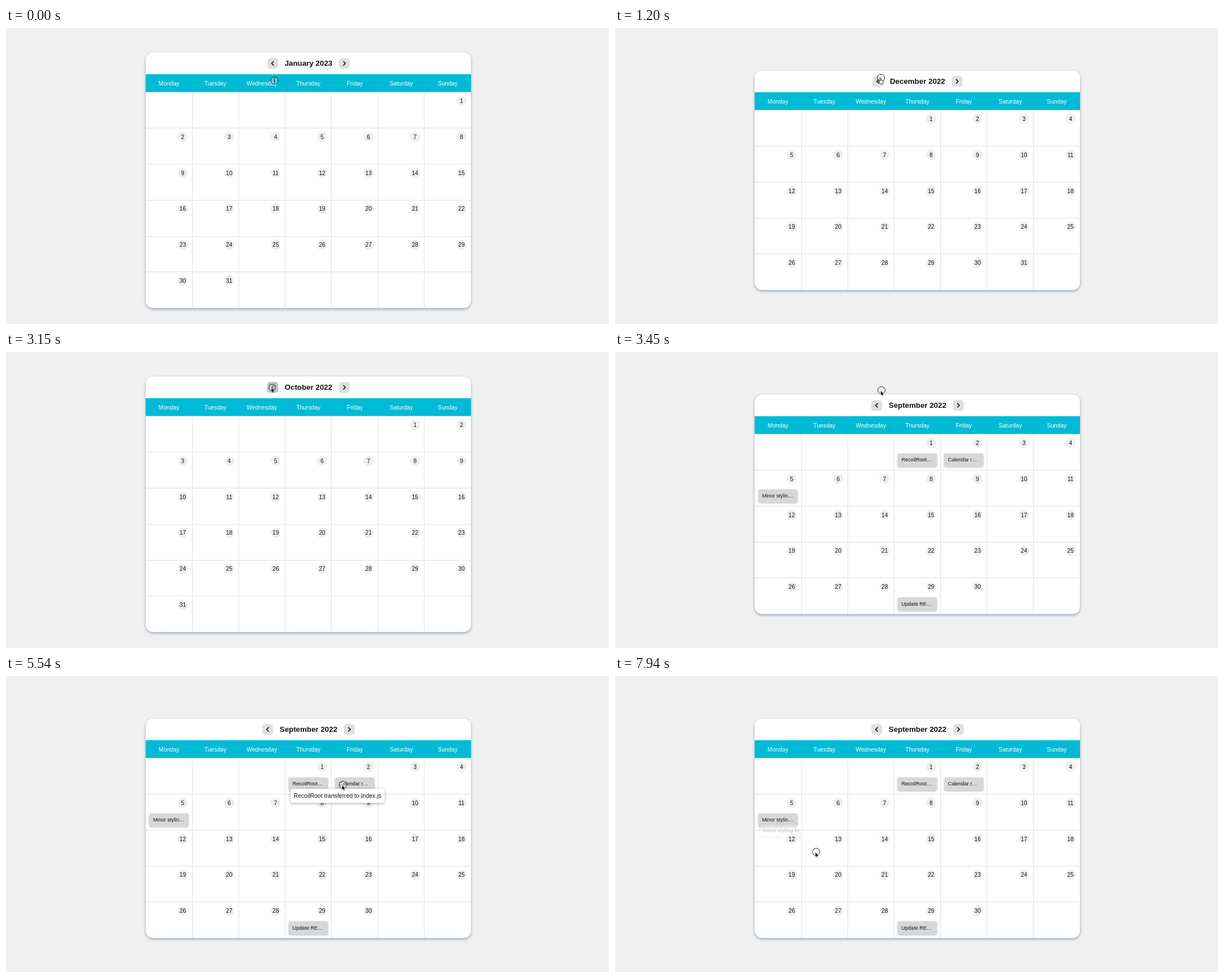
Write an HTML page that moves like this. It is 1066 px wide and 525 px high and loops after 8 s.

```html
<!DOCTYPE html>
<html lang="en">
<head>
<meta charset="utf-8">
<title>Calendar</title>
<style>
  html, body { margin: 0; width: 100%; height: 100%; overflow: hidden; background: #f0f0f0; }
  svg { display: block; font: 10.24px "Liberation Sans", Arial, sans-serif; fill: #111; }
  .card { fill: #fff; filter: drop-shadow(0 2px 2.5px rgba(20, 60, 100, .42)); }
  .bar { fill: #00bad6; }
  .day { fill: #fff; }
  .mid { text-anchor: middle; }
  .title { font-size: 13.3px; font-weight: bold; }
  .grid { stroke: #dfdfdf; fill: none; }
  .dot { fill: #efefef; }
  .btn { fill: #e0e0e0; }
  .down { fill: #b9c0c6; }
  .chev { fill: none; stroke: #111; stroke-width: 1.6; }
  .pill { fill: #d7d7d7; filter: drop-shadow(0 1.5px 1.5px rgba(0, 0, 0, .28)); }
  .note { font-size: 9.1px; }
  .tip { fill: #fff; filter: drop-shadow(0 1px 2.5px rgba(0, 0, 0, .35)); }
  .tipText { font-size: 10.45px; }
  .ring { fill: rgba(255, 255, 255, .3); stroke: #222; }
  .arrow { fill: #000; stroke: #fff; stroke-width: .8; }
  .hand { fill: #fff; stroke: #111; stroke-width: .9; }
  .beam { fill: none; stroke: #333; }
</style>
</head>
<body>
<svg id="stage" width="1066" height="525"></svg>
<script>
const LOOP = 8000, LEFT = 247, WIDTH = 575, COL = WIDTH / 7, ROW = 63.85, HEAD = 70.1;
const DAYS = ['Monday', 'Tuesday', 'Wednesday', 'Thursday', 'Friday', 'Saturday', 'Sunday'];

// month shown from each time on: [time, year, month index]
const MONTHS = [[0, 2023, 0], [750, 2022, 11], [1500, 2022, 10], [2250, 2022, 9], [3300, 2022, 8]];
const PRESSES = [600, 1350, 2100, 3150];

// September notes, with the times their tooltip opens and closes
const NOTES = [
  { day: 1, short: 'RecoilRoot…', full: 'RecoilRoot transferred to Index.js', tip: 166, open: 4300, close: 5740 },
  { day: 2, short: 'Calendar r…', full: 'Calendar restyling', tip: 95, open: 5640, close: 6490 },
  { day: 5, short: 'Minor stylin…', full: 'Minor styling fix', tip: 83, open: 7440, close: 7990 },
  { day: 29, short: 'Update RE…' }
];

// cursor path: time, x, y, shape
const PATH = [
  [0, 474.5, 93, 'beam'], [150, 473, 81, 'arrow'], [300, 471, 68, 'hand'], [450, 470, 63, 'hand'],
  [750, 470, 63, 'arrow'], [1050, 470, 87, 'hand'], [1200, 470, 88.5, 'hand'], [1350, 469, 92, 'arrow'],
  [1800, 469, 93, 'hand'], [2100, 469, 93, 'arrow'], [2400, 469, 90, 'arrow'], [2850, 470.5, 63, 'hand'],
  [3150, 470.5, 63, 'arrow'], [3450, 471, 68, 'arrow'], [4050, 494, 176, 'arrow'], [4350, 517.5, 194, 'arrow'],
  [5240, 545, 194, 'arrow'], [5540, 595.5, 193, 'arrow'], [5840, 599, 193, 'arrow'], [6290, 592, 197, 'arrow'],
  [6890, 345, 268, 'arrow'], [7040, 319, 265.5, 'hand'], [7190, 308, 261, 'hand'], [7340, 304, 257, 'hand'],
  [7640, 308, 259, 'hand'], [7940, 355.5, 312, 'arrow']
];
const SHAPES = {
  arrow: 'M-1.5 0v9.4l2-1.9 1.3 3 1.7-.7-1.3-2.9h2.8z',
  hand: 'M-1.6 1.2c0-1.4 1.8-1.4 1.8 0v3l3.3.8q1 .3.8 1.6l-.6 3.9h-4.6l-3.2-4.2q0-1 1-.8l1.5 1z',
  beam: 'M-1.7-4.2q1.7 0 1.7 1v6.4q0 1 1.7 1M1.7-4.2q-1.7 0-1.7 1v6.4q0 1-1.7 1M-1 0h2'
};

const clamp = v => Math.max(0, Math.min(1, v));
const text = (x, y, s, cls) => `<text x="${x}" y="${y}" class="${cls}">${s}</text>`;
const rect = (x, y, w, h, r, cls) =>
  `<rect x="${x}" y="${y}" width="${w}" height="${h}" rx="${r}" class="${cls}"/>`;

function titleWidth(s) {
  const pen = titleWidth.pen ||= document.createElement('canvas').getContext('2d');
  pen.font = 'bold 13.3px "Liberation Sans", Arial, sans-serif';
  return pen.measureText(s).width;
}

function button(x, y, dir, down) {
  return rect(x - 9.6, y - 9.6, 19.2, 19.2, 5, down ? 'down' : 'btn') +
    `<path class="chev" d="M${x - dir * 1.9} ${y - 3.8}l${dir * 3.8} 3.8l${-dir * 3.8} 3.8"/>`;
}

function calendar(t) {
  const [, year, month] = MONTHS.findLast(m => m[0] <= t);
  const first = (new Date(year, month, 1).getDay() + 6) % 7;
  const count = new Date(year, month + 1, 0).getDate();
  const rows = Math.ceil((first + count) / 7);
  const height = HEAD + rows * ROW, top = 270.1 - height / 2, body = top + HEAD;
  const cx = LEFT + WIDTH / 2 + .3, cy = top + 19.3;
  const title = new Date(year, month).toLocaleString('en-US', { month: 'long' }) + ' ' + year;
  const side = titleWidth(title) / 2 + 21.2;
  const down = PRESSES.some(p => t >= p && t < p + 150);
  const cell = d => {
    const i = first + d - 1;
    return [LEFT + i % 7 * COL, body + Math.floor(i / 7) * ROW];
  };

  let out = rect(LEFT, top, WIDTH, height, 13, 'card') + rect(LEFT, top + 38.5, WIDTH, HEAD - 38.5, 0, 'bar') +
    text(cx, cy + 4.6, title, 'mid title') + button(cx - side, cy, -1, down) + button(cx + side, cy, 1);
  DAYS.forEach((d, i) => out += text(LEFT + (i + .5) * COL, top + 58.1, d, 'mid day'));

  let lines = '';
  for (let i = 1; i < 7; i++) lines += `M${Math.floor(LEFT + i * COL) + .5} ${body}V${top + height}`;
  for (let i = 1; i < rows; i++) lines += `M${LEFT} ${Math.floor(body + i * ROW) + .5}h${WIDTH}`;
  out += `<path class="grid" d="${lines}"/>`;

  for (let d = 1; d <= count; d++) {
    const [x, y] = cell(d);
    out += `<circle class="dot" cx="${x + 65.4}" cy="${y + 15.6}" r="9"/>` + text(x + 65.4, y + 19.3, d, 'mid');
  }
  if (month === 8) {
    for (const n of NOTES) {
      const [x, y] = cell(n.day);
      out += rect(x + 6.4, y + 34.4, 69.2, 23.2, 3, 'pill') + text(x + 13, y + 48.7, n.short, 'note');
    }
    for (const n of NOTES) out += tooltip(n, t, ...cell(n.day));
  }
  return out;
}

// grows from its top left corner, the height faster than the width
function tooltip(n, t, x, y) {
  const k = n.full ? Math.min(clamp((t - n.open) / 200), clamp((n.close - t) / 200)) : 0;
  if (!k) return '';
  const s = .75 + .25 * k ** .35;
  return `<g opacity="${k}" transform="translate(${x + 9.8} ${y + 54.4}) scale(${s} ${s * s})">` +
    rect(0, 0, n.tip, 25, 4, 'tip') + text(5.3, 16.2, n.full, 'tipText') + '</g>';
}

function cursor(t) {
  const i = PATH.findLastIndex(p => p[0] <= t);
  const a = PATH[i], b = PATH[i + 1] || a;
  const k = a === b ? 0 : (t - a[0]) / (b[0] - a[0]);
  const x = a[1] + (b[1] - a[1]) * k, y = a[2] + (b[2] - a[2]) * k;
  const r = PRESSES.some(p => t >= p && t < p + 150) ? 5.8 : 6.5;
  return `<g transform="translate(${x} ${y})"><circle class="ring" r="${r}"/>` +
    `<path class="${a[3]}" d="${SHAPES[a[3]]}"/></g>`;
}

const step = t => t < 5240 ? Math.floor(t / 150) * 150 : 5240 + Math.floor((t - 5240) / 150) * 150;

const stage = document.getElementById('stage');
let shown = -1;
function draw(now) {
  const t = step(now % LOOP);
  if (t !== shown) {
    shown = t;
    stage.innerHTML = calendar(t) + cursor(t);
  }
  requestAnimationFrame(draw);
}
draw(performance.now());
</script>
</body>
</html>
```
